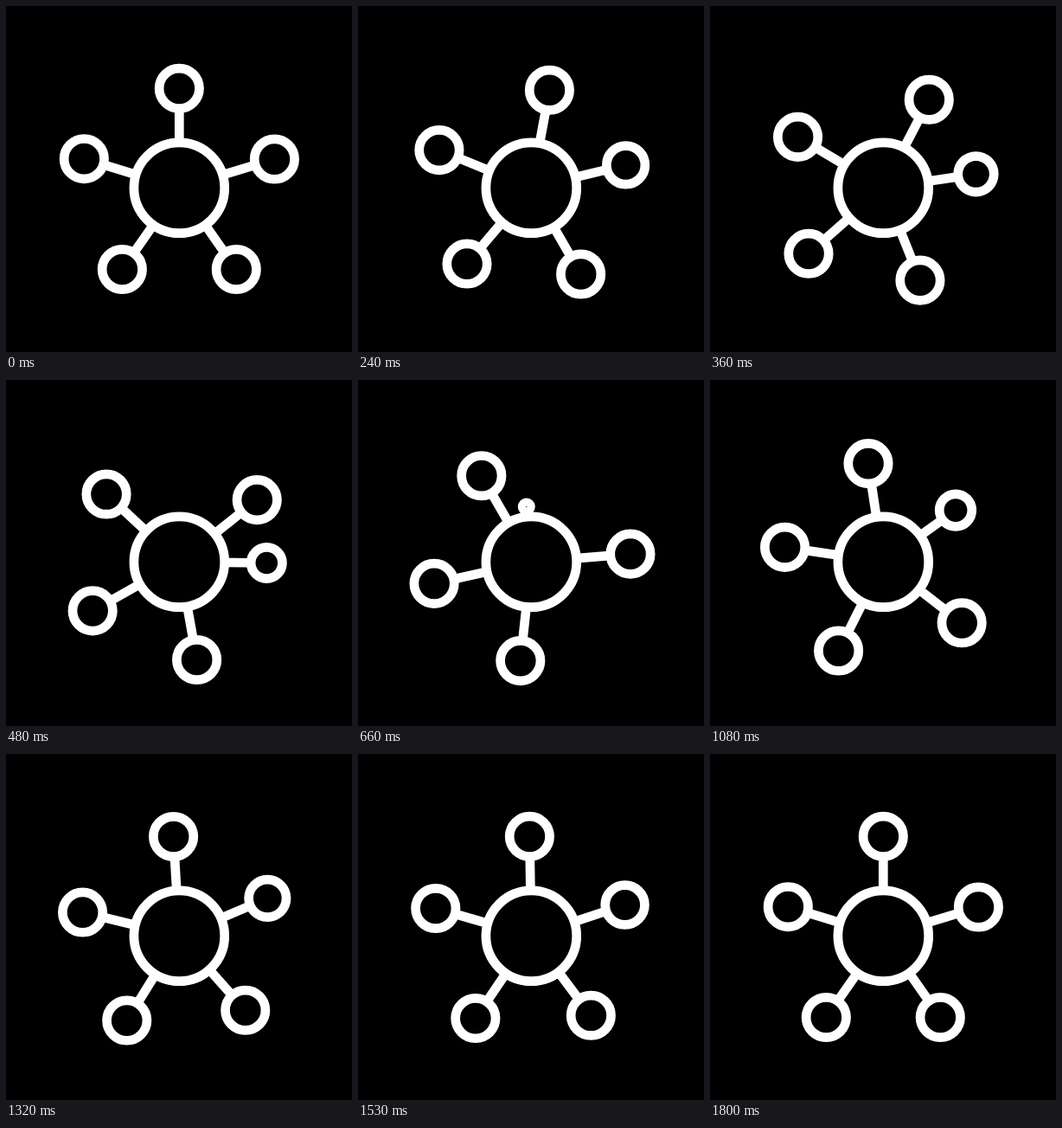
An HTML page with a canvas that plays this animation: 400x400 px, repeating every 2030 ms.

```html
<!DOCTYPE html>
<html lang="en">
<head>
<meta charset="utf-8">
<title>Hub and nodes</title>
<style>
  html, body { margin: 0; width: 100%; height: 100%; overflow: hidden; background: #000; }
  canvas { display: block; width: 400px; height: 400px; }
</style>
</head>
<body>
<canvas id="stage" width="400" height="400"></canvas>
<script>
const ctx = document.getElementById('stage').getContext('2d');
const LOOP = 2030, MOVE = 1800, STEP = 30;
const CX = 200.3, CY = 210.3;
const ARM = 115, HUB = 52.4, NODE = 23.2, LINE = 10.7;

// Four nodes each travel from one stop to the next; the fifth lives at HOME.
const STOPS = [-90, 55, 125, 197, 270];
const HOME = -16.8;

// cubic-bezier(.333, 0, .2, 1)
function ease(x) {
  let lo = 0, hi = 1;
  for (let i = 0; i < 30; i++) {
    const s = (lo + hi) / 2, r = 1 - s;
    const bx = s * r * r + 0.6 * s * s * r + s * s * s;
    if (bx < x) lo = s; else hi = s;
  }
  return lo * lo * (3 - 2 * lo);
}

function ring(x, y, radius) {
  ctx.beginPath();
  ctx.arc(x, y, radius, 0, Math.PI * 2);
  ctx.fill();
  ctx.stroke();
}

function node(degrees, arm = ARM, radius = NODE) {
  const a = degrees * Math.PI / 180;
  const x = arm * Math.cos(a), y = arm * Math.sin(a);
  ctx.beginPath();
  ctx.moveTo(0, 0);
  ctx.lineTo(x, y);
  ctx.stroke();
  if (radius > 0) ring(x, y, radius);
}

// Shrinks into the hub on one side, then grows back out on the other.
function duckingNode(p) {
  const leaving = p < 0.5;
  const hidden = leaving
    ? 0.55 * p + 0.725 * (2 * p) ** 10
    : (2 * (1 - p)) ** 1.15;
  const swing = leaving ? 80 : -98;
  node(HOME + swing * hidden, ARM - 64 * hidden, NODE * (1 - hidden));
}

function draw(time) {
  const p = ease(Math.min(time / MOVE, 1));
  ctx.setTransform(1, 0, 0, 1, 0, 0);
  ctx.fillStyle = '#000';
  ctx.strokeStyle = '#fff';
  ctx.lineWidth = LINE;
  ctx.fillRect(0, 0, 400, 400);
  ctx.translate(CX, CY);

  duckingNode(p);
  for (let i = 0; i < STOPS.length - 1; i++) {
    node(STOPS[i] + (STOPS[i + 1] - STOPS[i]) * p);
  }
  ring(0, 0, HUB);
}

const start = performance.now();
function tick() {
  const t = (performance.now() - start) % LOOP;
  draw(Math.floor(t / STEP) * STEP);
  requestAnimationFrame(tick);
}
tick();
</script>
</body>
</html>
```
